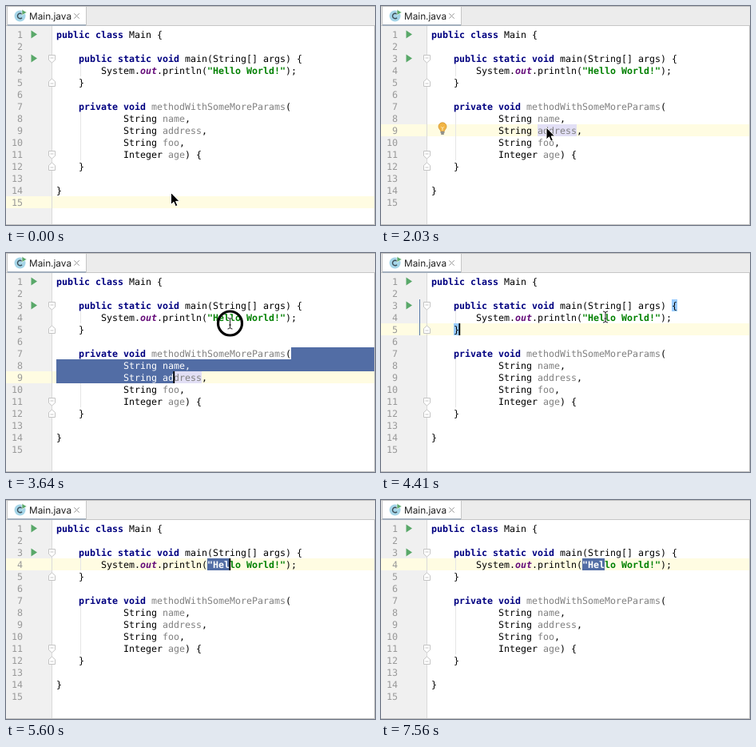
Animation of 462x274 px, one loop 7630 ms. Source, as an HTML page:

```html
<!DOCTYPE html>
<html lang="en">
<head>
<meta charset="utf-8">
<title>Editor caret demo</title>
<style>
  html, body { margin: 0; width: 100%; height: 100%; overflow: hidden; background: #fff; }
  svg { display: block; width: 100vw; height: 100vh; }
  text { white-space: pre; text-rendering: geometricPrecision; }
  .mono { font: 11.63px "DejaVu Sans Mono", "Liberation Mono", monospace; fill: #000; }
  .num { fill: #999; text-anchor: end; }
  .k { font-weight: bold; fill: #000080; }
  .s { font-weight: bold; fill: #008000; }
  .f { font-weight: bold; font-style: italic; fill: #660e7a; }
  .u { fill: #808080; }
  .inverse, .inverse tspan { fill: #fff; }
  .tab { font: 11.8px Inter, "Open Sans", sans-serif; fill: #222; }
</style>
</head>
<body>
<svg viewBox="0 0 462 274">
  <defs>
    <clipPath id="selClip"><path id="selClipPath"/></clipPath>
    <path id="fold" d="M-4 -4.5H4V1.5L0 5L-4 1.5Z M-2 -1H2" fill="#fff" stroke="#c4c4c4"/>
    <path id="run" d="M-3.5 -5L4 0L-3.5 5Z" fill="#59a869"/>
  </defs>

  <rect width="462" height="274" fill="#fff"/>
  <rect y="25" width="57" height="249" fill="#f0f0f0"/>
  <rect id="row" width="462" height="15" fill="#fffce2"/>
  <path d="M57.5 25V274" stroke="#dadada"/>
  <path d="M93.5 73V88M93.5 133V193" stroke="#e6e6e6"/>

  <rect width="462" height="25" fill="#ececec"/>
  <rect x="2" width="98" height="24" fill="#fff"/>
  <path d="M0 24.5H462M100.5 0V24M1.5 0V24" stroke="#c6c6c6"/>
  <rect x="2" y="23" width="98" height="2" fill="#a3afbd"/>
  <circle cx="17.5" cy="12.5" r="7" fill="#a5d5e8"/>
  <path d="M20 10.3A3.2 3.2 0 1 0 20 14.7" fill="none" stroke="#3c4d57" stroke-width="1.4"/>
  <path d="M20 4.5L26 8L20 11.5Z" fill="#59a869" stroke="#fff" stroke-width=".6"/>
  <text class="tab" x="29" y="16.5">Main.java</text>
  <path d="M85.3 9.3L91.7 15.7M91.7 9.3L85.3 15.7" stroke="#999"/>

  <g id="gutter"></g>
  <path id="scope" d="M48.5 58V103" stroke="#5578a8"/>
  <g id="braces" fill="#99ccff"><rect x="364" y="58" width="7" height="15"/><rect x="91" y="88" width="7" height="15"/></g>
  <rect id="usage" x="196" y="148" width="49" height="15" fill="#e2dff5"/>
  <g id="code" class="mono"></g>
  <path id="sel" fill="#526da5"/>
  <g clip-path="url(#selClip)"><g id="selCode" class="mono"></g></g>

  <g id="bulb">
    <path d="M74.5 156.5C74.5 154.5 72 153.8 72 150.8A5 5 0 0 1 82 150.8C82 153.8 79.5 154.5 79.5 156.5Z" fill="#f2b544" stroke="#c98e2b" stroke-width=".7"/>
    <path d="M75.3 151L77 153L78.7 151M77 153V156" fill="none" stroke="#fff2cc" stroke-width=".8"/>
    <path d="M74.5 158H79.5M75.2 160H78.8" stroke="#6e6e6e" stroke-width="1.3"/>
  </g>
  <rect id="caret" width="1.8" height="15"/>
  <g id="mouse">
    <path id="arrow" d="M-1 -4V11L2.5 7.8L4.8 13.2L7.4 12.1L5.1 6.9H9.6Z" stroke="#fff" stroke-width="1"/>
    <g id="beam" fill="none">
      <path d="M-3 -7Q0 -7 0 -5Q0 -7 3 -7M0 -5V5M-3 7Q0 7 0 5Q0 7 3 7M-1.5 2H1.5" stroke="#fff" stroke-width="2.4" opacity=".7"/>
      <path d="M-3 -7Q0 -7 0 -5Q0 -7 3 -7M0 -5V5M-3 7Q0 7 0 5Q0 7 3 7M-1.5 2H1.5" stroke="#222"/>
    </g>
    <circle id="ring" fill="none" stroke="#000" stroke-width="3.2"/>
  </g>
  <path d="M0 .5H462M0 273.5H462M461.5 25V274" stroke="#c0c0c0" fill="none"/>
</svg>
<script>
const LOOP = 7630, STEP = 70;
const $ = id => document.getElementById(id);
const colX = col => 63 + col * 7;
const rowY = line => 28 + (line - 1) * 15;

// Each line: indent column, then text with {style:word} spans.
const lines = [
  [0, '{k:public class} Main {'],
  null,
  [4, '{k:public static void} main(String[] args) {'],
  [8, 'System.{f:out}.println({s:"Hello World!"});'],
  [4, '}'],
  null,
  [4, '{k:private void} {u:methodWithSomeMoreParams}('],
  [12, 'String {u:name},'],
  [12, 'String {u:address},'],
  [12, 'String {u:foo},'],
  [12, 'Integer {u:age}) {'],
  [4, '}'],
  null,
  [0, '}'],
  null
];

function codeMarkup(cls) {
  return lines.map((line, i) => {
    if (!line) return '';
    const body = line[1].replace(/\{(\w):([^}]*)\}/g, '<tspan class="$1">$2</tspan>');
    return `<text class="${cls}" x="${colX(line[0])}" y="${rowY(i + 1) + 11.5}">${body}</text>`;
  }).join('');
}

$('code').innerHTML = codeMarkup('');
$('selCode').innerHTML = codeMarkup('inverse');
$('gutter').innerHTML =
  lines.map((_, i) => `<text class="mono num" x="21" y="${rowY(i + 1) + 12}">${i + 1}</text>`).join('') +
  [1, 3].map(n => `<use href="#run" x="35" y="${rowY(n) + 7.5}"/>`).join('') +
  [[3, 1], [5, -1], [11, 1], [12, -1]].map(([n, dir]) =>
    `<use href="#fold" transform="translate(57.5 ${rowY(n) + 8}) scale(1 ${dir})"/>`).join('');

// Caret: [start, line, column]
const carets = [[0, 15, 0], [630, 9, 21], [3710, 4, 31], [4270, 5, 5], [4550, 4, 31]];
// Times at which the caret turns on or off, starting hidden.
const blinks = [630, 1050, 1540, 2030, 2170, 2660, 3150, 4760, 5250, 5810, 6300, 6860, 7420, 7560];
// Pointer: [start, end, x, y]
const moves = [[0, 0, 207.5, 237.5], [70, 560, 208, 156], [2940, 3640, 280.5, 88], [3640, 3780, 281, 80]];
const clicks = [560, 3640];
const SELECT_PARAMS = 'M357 118H462V148H210V163H63V133H357Z';
const SELECT_STRING = 'M252 73H280V88H252Z';

const within = (t, a, b) => t >= a && t < b;
const show = (id, on) => $(id).setAttribute('visibility', on ? 'visible' : 'hidden');
const ease = p => p * p * (3 - 2 * p);

function pointer(t) {
  let [, , x, y] = moves[0];
  for (const [a, b, toX, toY] of moves.slice(1)) {
    if (t < a) break;
    const p = ease(Math.min(1, (t - a) / (b - a)));
    x += (toX - x) * p;
    y += (toY - y) * p;
  }
  return [x, y];
}

function draw(t) {
  const [, line, col] = carets.filter(c => c[0] <= t).pop();
  $('row').setAttribute('y', rowY(line));
  $('caret').setAttribute('x', colX(col) - .6);
  $('caret').setAttribute('y', rowY(line));
  show('caret', blinks.filter(b => b <= t).length % 2 === 1);

  const matched = within(t, 4270, 4550);
  show('scope', matched);
  show('braces', matched);
  show('usage', within(t, 980, 3710));
  show('bulb', within(t, 1540, 2170));

  const sel = within(t, 2170, 3710) ? SELECT_PARAMS : t >= 4550 ? SELECT_STRING : 'M0 0';
  $('sel').setAttribute('d', sel);
  $('selClipPath').setAttribute('d', sel);

  const [x, y] = pointer(t);
  $('mouse').setAttribute('transform', `translate(${x} ${y})`);
  show('arrow', t < 3010);
  show('beam', within(t, 3010, 4550));
  const click = clicks.find(c => within(t, c, c + 210));
  show('ring', click !== undefined);
  if (click !== undefined) $('ring').setAttribute('r', 15 + (t - click) / 28);
}

const start = performance.now();
function tick() {
  const t = (performance.now() - start) % LOOP;
  draw(Math.floor(t / STEP) * STEP);
  requestAnimationFrame(tick);
}
draw(0);
requestAnimationFrame(tick);
</script>
</body>
</html>
```
